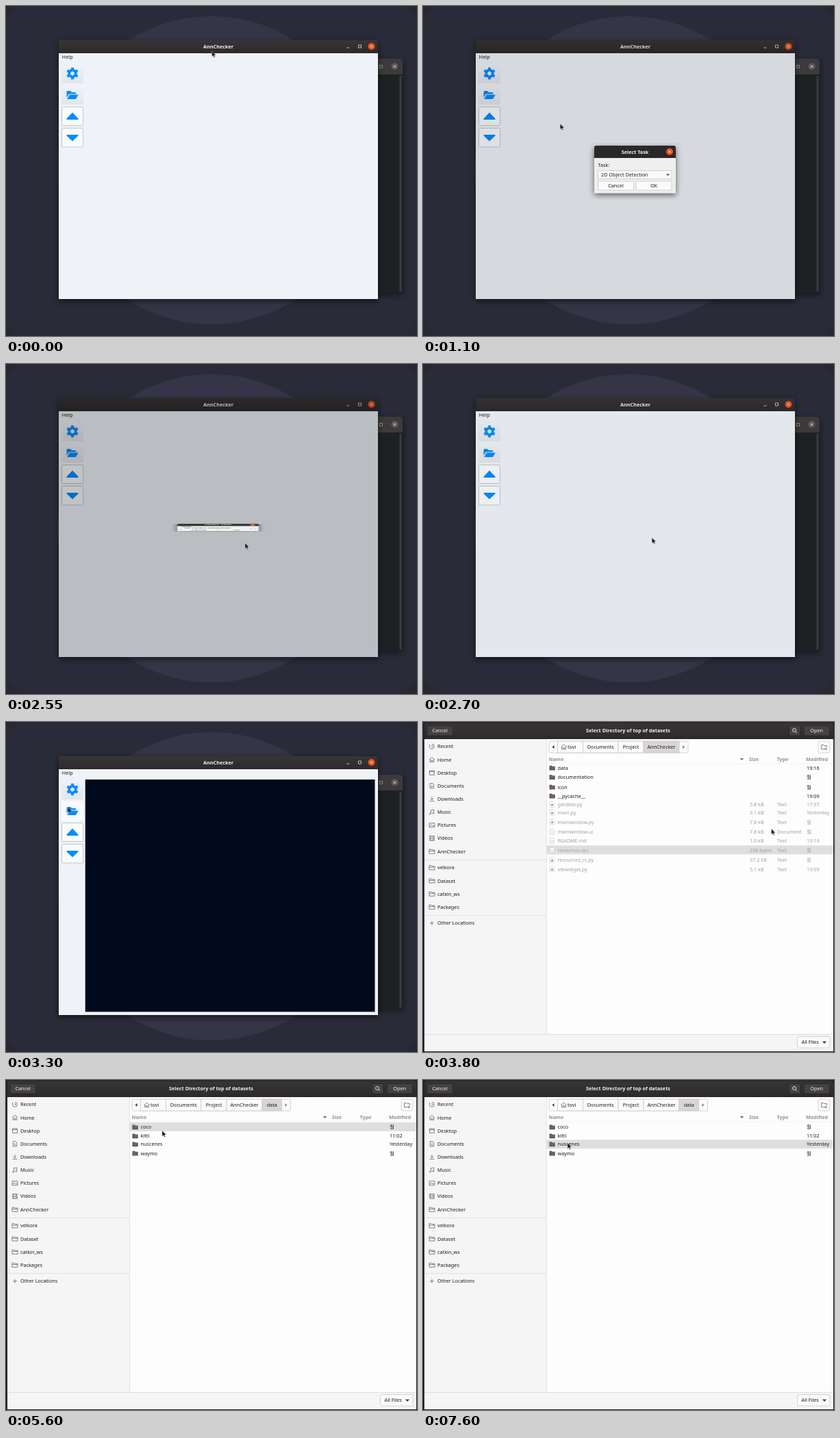
Animation, 600 px wide and 482 px high, one loop 8000 ms. Source, as an HTML page:

```html
<!DOCTYPE html>
<html lang="en">
<head>
<meta charset="utf-8">
<title>AnnChecker</title>
<style>
html, body { margin: 0; width: 100%; height: 100%; overflow: hidden; background: #2a2b38; }
svg { display: block; width: 600px; height: 482px; }
text { font: 7.25px 'Noto Sans', 'Noto Sans CJK KR', sans-serif; fill: #1c1c1c; white-space: pre; }
.b { font-weight: 700; }
.mid { text-anchor: middle; }
.light { fill: #f4f2f2; }
.dim { fill: #a0a0a0; }
.head { font-weight: 700; fill: #929292; }
.line { fill: none; stroke: #5a5a5a; stroke-width: .75; }
.btn { fill: #fafafa; stroke: #cbc8c6; stroke-width: .8; }
.dark { fill: #454143; stroke: #252223; stroke-width: .8; }
.blue { fill: #078bff; }

#cursor { animation: cursor 8s ease-in-out infinite; }
#shade { animation: shade 8s linear infinite; }
#dialog { animation: dialog 8s ease-out infinite; transform-origin: 309.5px 239px; }
#chooser { animation: chooser 8s ease-out infinite; transform-origin: 300px 241px; }
#popup { animation: popup 8s step-end infinite; }
#pick { animation: pick 8s step-end infinite; }
#old { animation: old 8s step-end infinite; }
#new { animation: new 8s step-end infinite; }
#panel { animation: panel 8s step-end infinite; }
#glow { animation: glow 8s step-end infinite; }
#hover { animation: hover 8s step-end infinite; }
#listA { animation: listA 8s step-end infinite; }
#listB { animation: listB 8s step-end infinite; }

@keyframes cursor {
  0% { transform: translate(303px, 65px); animation-timing-function: ease-out; }
  1.875%, 3.75% { transform: translate(88.5px, 132px); }
  8.125%, 10.625% { transform: translate(94px, 97px); }
  16.875%, 17.5% { transform: translate(305px, 246px); }
  20.625% { transform: translate(297.5px, 259px); }
  23.125%, 24.375% { transform: translate(300px, 270px); }
  29.375%, 32.5% { transform: translate(349px, 261.5px); }
  40%, 41.875% { transform: translate(90.5px, 124.5px); }
  45.625% { transform: translate(450px, 188px); animation-timing-function: linear; }
  47.5% { transform: translate(509px, 156px); animation-timing-function: ease-out; }
  60% { transform: translate(228px, 72px); }
  66.25%, 75.625% { transform: translate(228px, 74px); }
  78.125%, 80% { transform: translate(188.5px, 85px); }
  85%, 86.25% { transform: translate(216px, 83px); }
  86.875%, 91.25% { transform: translate(219px, 87px); }
  95%, 100% { transform: translate(211px, 92px); }
}
@keyframes shade {
  0%, 11.875% { opacity: 0; }
  17.5%, 31.05% { opacity: .3; }
  34.175%, 100% { opacity: 0; }
}
@keyframes dialog {
  0%, 11.875% { transform: scaleY(0); }
  13.125%, 31.05% { transform: scaleY(1); }
  32.3%, 100% { transform: scaleY(0); }
}
@keyframes chooser {
  0%, 43.75% { transform: scaleY(0); }
  45%, 100% { transform: scaleY(1); }
}
@keyframes popup { 0%, 23.75%, 100% { opacity: 0; } 17.5% { opacity: 1; } }
@keyframes pick {
  0% { transform: none; }
  20% { transform: translateY(12.6px); }
  22.5%, 100% { transform: translateY(25.2px); }
}
@keyframes old { 0% { opacity: 1; } 23.75%, 100% { opacity: 0; } }
@keyframes new { 0% { opacity: 0; } 23.75%, 100% { opacity: 1; } }
@keyframes panel { 0% { opacity: 0; } 34.375%, 100% { opacity: 1; } }
@keyframes glow { 0%, 5.625%, 43.75%, 100% { opacity: 0; } 1.875%, 38.75% { opacity: 1; } }
@keyframes listA { 0% { opacity: 1; } 63.125%, 100% { opacity: 0; } }
@keyframes listB { 0% { opacity: 0; } 63.125%, 100% { opacity: 1; } }
/* The row highlight trails the pointer */
@keyframes hover {
  0% { transform: translateY(180.3px); }
  48.125% { transform: translateY(153.5px); }
  49.375% { transform: translateY(139px); }
  50.625% { transform: translateY(126px); }
  51.875% { transform: translateY(114px); }
  53.125% { transform: translateY(101.5px); }
  55% { transform: translateY(88.5px); }
  56.875% { transform: translateY(74px); }
  58.75% { transform: translateY(60.7px); }
  63.125% { transform: translateY(62px); }
  80.625% { transform: translateY(75px); }
  92.5%, 100% { transform: translateY(87.3px); }
}
</style>
</head>
<body>
<svg viewBox="0 0 600 482">
  <defs>
    <linearGradient id="bar" x2="0" y2="1"><stop stop-color="#393536"/><stop offset="1" stop-color="#2d2a2c"/></linearGradient>
    <linearGradient id="face" x2="0" y2="1"><stop stop-color="#eff3f8"/><stop offset="1" stop-color="#e2e5ea"/></linearGradient>
    <filter id="soft" x="-10%" y="-10%" width="120%" height="120%"><feGaussianBlur stdDeviation="4"/></filter>
    <g id="close"><circle r="5" fill="#e95420"/><path d="M-1.7-1.7 1.7 1.7M1.7-1.7-1.7 1.7" stroke="#fff" stroke-width=".8"/></g>
    <g id="dirFull"><path d="M-4-3.3H-.6L.4-2.3H4.2V3.5H-4Z" fill="#595558"/><path d="M-4-1H4.2" stroke="#a0707c" stroke-width=".8"/><path d="M-2 1.2H2.2" stroke="#89868a" stroke-width=".8"/></g>
    <path id="page" d="M-3-3.8H1.4L3-2.2V3.8H-3Z" fill="#fff" stroke="#c6c6c6" stroke-width=".7"/>
  </defs>

  <rect width="600" height="482" fill="#272834"/>
  <circle cx="300" cy="240" r="372" fill="#2a2b38"/>
  <circle cx="300" cy="240" r="225" fill="#353547"/>

  <!-- Terminal behind -->
  <rect x="500" y="80" width="80" height="342" opacity=".45" filter="url(#soft)"/>
  <path d="M500 77H574Q579 77 579 82V419H500Z" fill="#1e2124"/>
  <path d="M500 77H574Q579 77 579 82V100H500Z" fill="#3c3a3b"/>
  <rect x="574.5" y="102" width="3" height="315" fill="#3a3d3f"/>
  <rect x="545.5" y="86.5" width="4" height="4" fill="none" stroke="#aaa" stroke-width=".7"/>
  <circle cx="567.5" cy="88.3" r="5" fill="#5c595a"/>
  <path d="M565.8 86.6 569.2 90M569.2 86.6 565.8 90" stroke="#eee" stroke-width=".9"/>

  <!-- Main window -->
  <rect x="77" y="53" width="466" height="378" opacity=".55" filter="url(#soft)"/>
  <path d="M77 69V54Q77 50 81 50H539Q543 50 543 54V69Z" fill="url(#bar)"/>
  <text x="310" y="62" class="b mid light">AnnChecker</text>
  <path d="M497.5 61H501.5M514.5 57H518.5V61H514.5Z" fill="none" stroke="#e6e6e6" stroke-width=".8"/>
  <use href="#close" x="533.5" y="59"/>
  <rect x="77" y="69" width="466" height="359" fill="#eff3f8"/>
  <text x="81.8" y="76.8">Help</text>
  <rect x="81" y="85" width="32" height="28" fill="url(#face)"/>
  <rect x="81" y="116" width="32" height="28" fill="url(#face)"/>
  <rect id="glow" x="81" y="116" width="32" height="28" fill="#f7f9fc"/>
  <g fill="#f9fafc" stroke="#bbc1ca" stroke-width=".9">
    <rect x="81.5" y="147.5" width="31" height="27" rx="1"/>
    <rect x="81.5" y="178.5" width="31" height="27.5" rx="1"/>
  </g>
  <g fill="none" stroke="#078bff" transform="translate(97 98.5)">
    <circle r="4.8" stroke-width="3.8"/>
    <circle r="7.3" stroke-width="2.8" pathLength="12" stroke-dasharray="1 1" stroke-dashoffset=".5" transform="rotate(-90)"/>
  </g>
  <path class="blue" d="M88.5 134V125.5Q88.5 124 90 124H94L96 126H101Q102.3 126 102.3 127.5V128.5H93Q91.7 128.5 91 129.8ZM89.2 136 92.2 130.5Q92.6 129.6 93.6 129.6H105.6L102.6 135Q102 136 101 136Z"/>
  <path class="blue" d="M97 155.5 105.5 164.5Q106 166 104.5 166H89.5Q88 166 88.5 164.5ZM97 197.5 105.5 189.5Q106 188 104.5 188H89.5Q88 188 88.5 189.5Z"/>
  <rect id="panel" x="115.7" y="84" width="422.8" height="339.3" fill="#000a1c"/>
  <path id="shade" d="M77 428V54Q77 50 81 50H539Q543 50 543 54V428Z"/>

  <g id="dialog">
    <rect x="250" y="207" width="119" height="69" opacity=".6" filter="url(#soft)"/>
    <rect x="250" y="215" width="119" height="58.5" fill="#efefef"/>
    <path d="M250 222V207Q250 204 253 204H366Q369 204 369 207V222Z" fill="#2b2829"/>
    <text x="309.5" y="215.8" class="b mid light">Select Task</text>
    <use href="#close" x="360" y="212.8"/>
    <text x="255.5" y="235">Task:</text>
    <rect class="btn" x="255.5" y="240.5" width="107.5" height="12"/>
    <path d="M355 245.2H360L357.5 248.2Z" fill="#555"/>
    <text id="old" x="260" y="249.2">2D Object Detection</text>
    <text id="new" x="260" y="249.2">3D Object Detection</text>
    <rect class="btn" x="255.5" y="256" width="52" height="13"/>
    <rect class="btn" x="311" y="256" width="52" height="13"/>
    <text x="281.5" y="265.2" class="mid">Cancel</text>
    <text x="337" y="265.2" class="mid">OK</text>
    <g id="popup">
      <rect x="255.5" y="240.3" width="107.5" height="37.8" fill="#f1f1f1" stroke="#858585" stroke-width=".7"/>
      <rect id="pick" x="255.8" y="240.5" width="107" height="12.3" fill="#2a8bd2"/>
      <text x="260" y="249.2">2D Object Detection</text>
      <text x="260" y="261.9">2D Semantic Segmentation</text>
      <text x="260" y="274.5">3D Object Detection</text>
    </g>
  </g>

  <!-- File chooser -->
  <g id="chooser">
    <rect y="1" width="600" height="481" fill="#1d1d28"/>
    <rect x="2" y="25" width="597" height="456" fill="#fdfdfd"/>
    <path d="M2 25V5Q2 1.5 5.5 1.5H595.5Q599 1.5 599 5V25Z" fill="url(#bar)"/>
    <rect class="dark" x="6" y="5.3" width="37.5" height="14.7" rx="2"/>
    <rect class="dark" x="534.5" y="5.3" width="16.5" height="14.7" rx="2"/>
    <rect class="dark" x="556" y="5.3" width="37.5" height="14.7" rx="2"/>
    <text x="24.7" y="15.2" class="mid light">Cancel</text>
    <text x="574.7" y="15.2" class="mid light">Open</text>
    <text x="299.5" y="15.2" class="b mid light">Select Directory of top of datasets</text>
    <g fill="none" stroke="#eee" stroke-width=".9"><circle cx="542" cy="12" r="2.5"/><path d="M544 14 546 16"/></g>
    <rect x="2" y="25" width="178" height="431" fill="#f6f5f6"/>
    <path d="M180.3 25V456M2 201.5H180M2 282.5H180" stroke="#dcdadb" stroke-width=".8"/>
    <rect x="2" y="456" width="597" height="24" fill="#f6f5f6"/>
    <path d="M2 456.3H599" stroke="#d6d4d5" stroke-width=".8"/>
    <rect class="btn" x="546.5" y="459.5" width="47.5" height="16.5" rx="2"/>
    <text x="552.5" y="470.4">All Files</text>
    <path d="M583 466.5H589L586 469.8Z" fill="#333"/>
    <g id="side"></g>
    <rect class="btn" x="577" y="28" width="17" height="17" rx="2"/>
    <path class="line" d="M581.5 33.5H584.5L585.5 34.5H589.5V37M586 39.7H581.5V33.5M588 37.5V41.5M586 39.5H590"/>
    <text class="head" x="183.5" y="57.2">Name</text>
    <text class="head" x="476" y="57.2">Size</text>
    <text class="head" x="516.5" y="57.2">Type</text>
    <text class="head" x="559" y="57.2">Modified</text>
    <path d="M462.5 53H468.5L465.5 56Z" fill="#777"/>
    <path d="M181 60.8H599" stroke="#e8e8e8" stroke-width=".6"/>
    <rect id="hover" x="180.7" width="418" height="12.9" fill="#dedede"/>
    <g id="listA"></g>
    <g id="listB"></g>
  </g>

  <path id="cursor" d="M0 0V8.3L1.9 6.6 3.2 9.5 4.5 8.9 3.2 6.1H5.8Z" fill="#111" stroke="#ddd" stroke-width=".45"/>
</svg>
<script>
const fill = (id, html) => { document.getElementById(id).innerHTML = html; };
const text = (s, x, y, cls = '') => `<text x="${x}" y="${y + 2.6}" class="${cls}">${s}</text>`;
const use = (id, x, y) => `<use href="#${id}" x="${x}" y="${y}"/>`;

// Small outline icons, centred on 0,0
const icons = {
  recent: 'M-3.5 0A3.5 3.5 0 1 0 0-3.5M-3.5 0V-3M0-2V0H2',
  home: 'M-4 0 0-3.5 4 0M-2.8-.5V3.5H-.8V1H.8V3.5H2.8V-.5',
  desktop: 'M-3.5-3H3.5V3.2H-3.5ZM-3.5-1.5H3.5',
  doc: 'M-2.7-3.6H1.2L2.7-2V3.6H-2.7ZM-1 0H1M-1 1.7H1',
  down: 'M0-3.5V1.5M-2.2-.7 0 1.5 2.2-.7M-3.5 3.3H3.5',
  music: 'M-1.5 2.5V-2.8L2.8-3.6V1.7M-1.5 2.5A1 1 0 1 1-2.5 1.5M2.8 1.7A1 1 0 1 1 1.8.7',
  photo: 'M-3.8-3H3.8V3H-3.8ZM-3.8 2-1-.8 1 1.2 2 .2 3.8 2',
  video: 'M-3.3-3.3H3.3V3.3H-3.3ZM-1.8-3.3V3.3M1.8-3.3V3.3M-1.8 0H1.8',
  plus: 'M-3 0H3M0-3V3',
  dir: 'M-4-3H-1L0-2H4V3.2H-4ZM-4-.6H4'
};
const icon = (name, x, y) => `<path class="line" transform="translate(${x} ${y})" d="${icons[name]}"/>`;

const places = [
  ['Recent', 'recent'], ['Home', 'home'], ['Desktop', 'desktop'], ['Documents', 'doc'],
  ['Downloads', 'down'], ['Music', 'music'], ['Pictures', 'photo'], ['Videos', 'video'],
  ['AnnChecker', 'dir'], ['velkora', 'dir'], ['Dataset', 'dir'], ['catkin_ws', 'dir'],
  ['Packages', 'dir'], ['Other Locations', 'plus']
];
fill('side', places.map(([name, ic], i) => {
  const y = 35.8 + i * 19.15 + (i > 8 ? 4.6 : 0) + (i > 12 ? 4.5 : 0);
  return icon(ic, 13, y) + text(name, 21, y);
}).join(''));

// Path bar: label and right edge of each button; the last one is current
function pathBar(parts) {
  const end = parts[parts.length - 1][1];
  let x = 196.5;
  let out = `<rect class="btn" x="184" y="28" width="${end + 13 - 184}" height="17" rx="2"/>`;
  parts.forEach(([name, right], i) => {
    const tint = i === parts.length - 1 ? ' style="fill:#d8d6d5"' : '';
    out += `<rect class="btn" x="${x}" y="28" width="${right - x}" height="17"${tint}/>`;
    out += i ? text(name, (x + right) / 2, 36.3, 'mid') : icon('home', 205.5, 36.5) + text(name, 211, 36.3);
    x = right;
  });
  return out + `<path d="M191.5 34V39L188.5 36.5Z" fill="#333"/><path d="M${end + 5} 34V39L${end + 8} 36.5Z" fill="#888"/>`;
}

// Folders have no size or type
function row([name, y, when, size, type]) {
  if (!size) return use('dirFull', 188.5, y) + text(name, 196.5, y) + text(when, 560, y);
  const mark = name.endsWith('.py')
    ? `<circle cx="188.5" cy="${y + .5}" r="1.5" fill="#6f9aa5"/>`
    : `<path d="M187 ${y}H190M187 ${y + 1.5}H190" stroke="#bbb" stroke-width=".6"/>`;
  return use('page', 188.5, y) + mark + text(name, 196.5, y, 'dim') + text(when, 560, y, 'dim') +
    text(size, 477, y, 'dim') + text(type, 517, y, 'dim');
}

const trail = [['tovi', 233.5], ['Documents', 285], ['Project', 322], ['AnnChecker', 374]];
fill('listA', pathBar(trail) + [
  ['data', 67, '19:16'],
  ['documentation', 80.5, '월'],
  ['icon', 95, '월'],
  ['__pycache__', 108, '19:09'],
  ['getdata.py', 120.5, '17:37', '5.8 kB', 'Text'],
  ['main.py', 132.5, 'Yesterday', '3.1 kB', 'Text'],
  ['mainwindow.py', 146, '월', '7.8 kB', 'Text'],
  ['mainwindow.ui', 160.3, '월', '7.8 kB', 'Document'],
  ['README.md', 173.5, '19:14', '1.0 kB', 'Text'],
  ['resources.qrc', 187, '월', '208 bytes', 'Text'],
  ['resources_rc.py', 201.7, '월', '37.2 kB', 'Text'],
  ['vtkwidget.py', 215, '19:09', '5.1 kB', 'Text']
].map(row).join(''));
fill('listB', pathBar([...trail, ['data', 402.5]]) + [
  ['coco', 68.7, '월'],
  ['kitti', 81.7, '11:02'],
  ['nuscenes', 93.8, 'Yesterday'],
  ['waymo', 107, '월']
].map(row).join(''));
</script>
</body>
</html>
```
